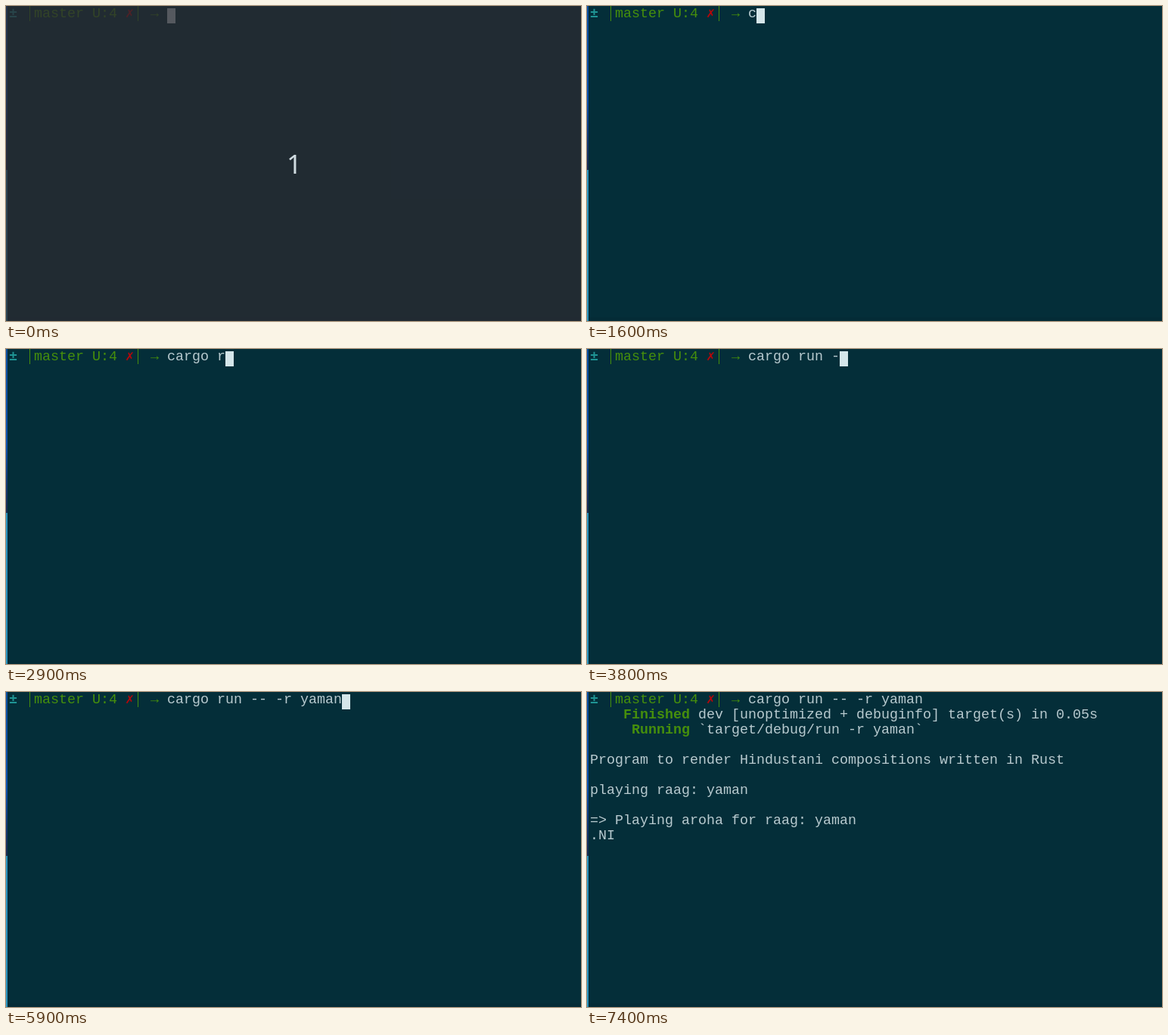
Recreate the animation shown at these times as an HTML page. Size 760 px wide and 417 px high, loop 8 s.

```html
<!DOCTYPE html>
<html lang="en">
<head>
<meta charset="utf-8">
<title>Terminal</title>
<style>
  html, body { margin: 0; width: 100%; height: 100%; overflow: hidden; background: #042e39; }
  svg { display: block; width: 760px; height: 417px; }
  text { font: 18.33px "Liberation Mono", monospace; fill: #b8cacf; white-space: pre; }
  .green { fill: #468f0c; }
  .bold { font-weight: bold; }
  .teal { fill: #1f9494; }
  .cross { font-family: "DejaVu Sans Mono", monospace; fill: #b8060a; }
  .count { font: 35px "Noto Sans", sans-serif; fill: #d0dbe0; }
</style>
</head>
<body>
<svg viewBox="0 0 760 417">
  <defs>
    <linearGradient id="edge" x2="0" y2="1">
      <stop offset="0" stop-color="#0b4fa0"/>
      <stop offset=".3" stop-color="#0c52b0"/>
      <stop offset=".42" stop-color="#123a78"/>
      <stop offset=".52" stop-color="#1a2c52"/>
      <stop offset=".52" stop-color="#2a93bd"/>
      <stop offset="1" stop-color="#2a93bd"/>
    </linearGradient>
  </defs>
  <rect width="760" height="417" fill="#042e39"/>
  <rect y="412" width="760" height="5" fill="#042b36"/>
  <rect width="2" height="417" fill="url(#edge)"/>

  <text class="teal bold" x="4" y="15">±</text>
  <rect class="green" x="31" width="1" height="20"/>
  <text class="green" x="37" y="15">master U:4</text>
  <text class="cross" x="158" y="15">✗</text>
  <rect class="green" x="174" width="1" height="20"/>
  <text class="green" x="191" y="15">→</text>
  <text id="command" x="213" y="15"></text>

  <g id="output">
    <text class="green bold" x="48" y="35">Finished</text>
    <text x="147" y="35">dev [unoptimized + debuginfo] target(s) in 0.05s</text>
    <text class="green bold" x="59" y="55">Running</text>
    <text x="147" y="55">`target/debug/run -r yaman`</text>
    <text x="4" y="95">Program to render Hindustani compositions written in Rust</text>
    <text x="4" y="135">playing raag: yaman</text>
    <text x="4" y="175">=&gt; Playing aroha for raag: yaman</text>
    <text x="4" y="195">.NI</text>
  </g>
  <rect id="cursor" width="11" height="20" fill="#d5e6ea"/>

  <g id="countdown">
    <rect width="760" height="417" fill="rgb(43,42,49)" fill-opacity=".75"/>
    <text class="count" x="371" y="222">1</text>
  </g>
</svg>
<script>
  const LOOP = 8000, CELL = 11, LINE = 20, PROMPT_COLS = 19;
  const COMMAND = "cargo run -- -r yaman";
  // Time of each keystroke, in tenths of a second.
  const KEYS = [16, 18, 19, 22, 23, 25, 29, 31, 33, 35, 38, 39, 45,
                49, 50, 51, 55, 56, 57, 58, 59];
  const CURSOR_OFF = [[100, 700], [1300, 1500], [6400, 6800], [7400, LOOP]];
  const ENTER = 6900, OUTPUT = 7000;

  const [command, output, cursor, countdown] =
    ["command", "output", "cursor", "countdown"].map(id => document.getElementById(id));

  const show = (node, visible) => node.setAttribute("visibility", visible ? "visible" : "hidden");

  function cursorCell(t, typed) {
    if (t >= OUTPUT) return [4, 9];
    if (t >= ENTER) return [0, 1];
    return [PROMPT_COLS + typed, 0];
  }

  function render(t) {
    const typed = KEYS.filter(key => key * 100 <= t).length;
    const [col, row] = cursorCell(t, typed);
    command.textContent = COMMAND.slice(0, typed);
    cursor.setAttribute("x", 4 + col * CELL);
    cursor.setAttribute("y", 3 + row * LINE);
    show(cursor, !CURSOR_OFF.some(([from, to]) => t >= from && t < to));
    show(output, t >= OUTPUT);
    show(countdown, t < 100);
  }

  const start = performance.now();
  function tick() {
    render((performance.now() - start) % LOOP);
    requestAnimationFrame(tick);
  }
  tick();
</script>
</body>
</html>
```
